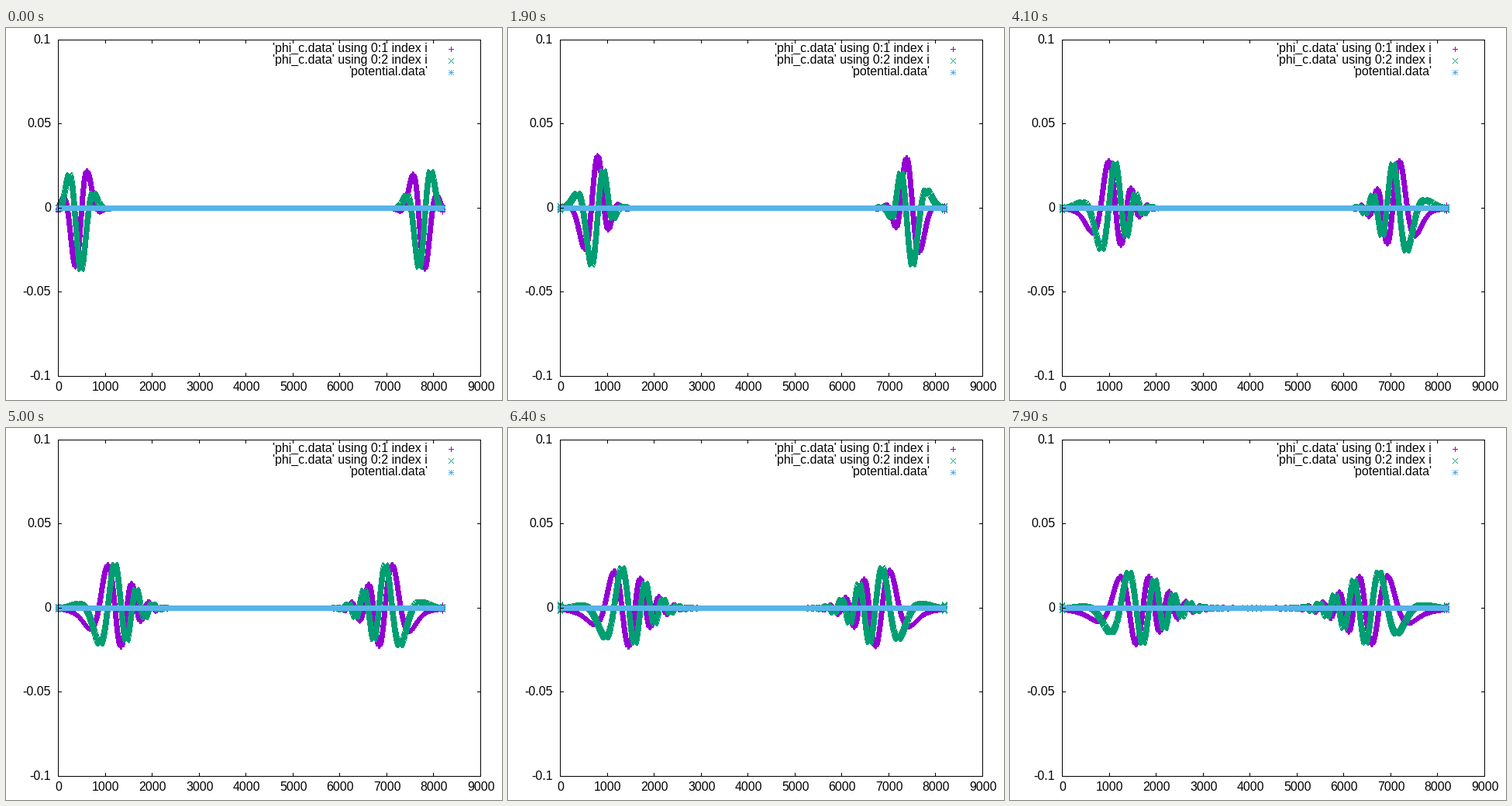
Recreate the animation shown at these times as a matplotlib script. Size 640 by 480 pixels, loop 8 s.

```python
import numpy as np
import matplotlib.pyplot as plt
from matplotlib.animation import FuncAnimation

W, H = 640, 480
FRAMES, STEP = 80, 100
LEFT, RIGHT, TOP, BOTTOM = 67, 612, 15, 449
TICK = 5
N = 8192

PURPLE, GREEN, BLUE = (148, 0, 211), (0, 158, 115), (86, 180, 233)

# Marker shapes as pixel offsets
ARM = range(-3, 4)
PLUS = [(i, 0) for i in ARM] + [(0, i) for i in ARM]
CROSS = [(i, i) for i in ARM] + [(i, -i) for i in ARM]
STAR = PLUS + CROSS

# Wave packet: wave number, start, dispersion
K, START, DISP = 0.0102, 435, 1377


def to_px(x):
    return np.rint(LEFT + np.asarray(x) * (RIGHT - LEFT) / 9000).astype(int)


def to_py(y):
    mid = (TOP + BOTTOM) / 2
    scale = (BOTTOM - TOP) / 0.2
    return np.ceil(mid - np.asarray(y) * scale - 0.5).astype(int)


def gaussian(d, t, amp, waist):
    """Spreading complex Gaussian at distance d from its centre."""
    q = 1 + 1j * DISP * t / waist**2
    return amp / np.sqrt(q) * np.exp(-d**2 / (2 * waist**2 * q))


def packet(x, t, phase):
    """Packet with a faint fast tail, leaving a wall at x = 0."""
    d = x - START - DISP * K * t
    shape = gaussian(d, t, 0.0355, 202) + gaussian(d, t, 0.003, 80)
    wave = shape * np.exp(1j * (phase + K * d + DISP * K**2 * t / 2))
    ripple = 0.0022 * np.exp(2j * np.pi * t / 17) * np.exp(-x / 10)
    return wave * (1 - np.exp(-x / 50)) - ripple * np.cos(np.pi * x)


def stamp(img, px, py, shape, color):
    for dx, dy in shape:
        img[py + dy, px + dx] = color


def draw_border(img):
    img[[TOP, BOTTOM], LEFT:RIGHT + 1] = 0
    img[TOP:BOTTOM + 1, [LEFT, RIGHT]] = 0
    for px in to_px(np.arange(0, 9001, 1000)):
        img[TOP:TOP + TICK, px] = 0
        img[BOTTOM + 1 - TICK:BOTTOM + 1, px] = 0
    for py in to_py(np.linspace(-0.1, 0.1, 5)):
        img[py, LEFT:LEFT + TICK] = 0
        img[py, RIGHT + 1 - TICK:RIGHT + 1] = 0


x = np.arange(N)
px = to_px(x)


def render(t):
    img = np.full((H, W, 3), 255, np.uint8)
    psi = packet(x, t, 4.05) + packet(N - 1 - x, t, 3.84)
    stamp(img, px, to_py(psi.real), PLUS, PURPLE)
    stamp(img, px, to_py(psi.imag), CROSS, GREEN)
    stamp(img, px, to_py(0 * x), STAR, BLUE)
    for py, shape, color in ((27, PLUS, PURPLE), (42, CROSS, GREEN),
                             (57, STAR, BLUE)):
        stamp(img, 574, py, shape, color)
    draw_border(img)
    return img


plt.rcParams["text.hinting"] = "native"
fig = plt.figure(figsize=(W / 100, H / 100), dpi=100, facecolor="white")
ax = fig.add_axes([0, 0, 1, 1])
ax.axis("off")
canvas = ax.imshow(render(0), extent=(0, W, H, 0), aspect="auto",
                   interpolation="nearest")
ax.set_xlim(0, W)
ax.set_ylim(H, 0)


def label(lx, ly, text, ha):
    ax.text(lx, ly, text, ha=ha, va="baseline", color="black",
            family="Liberation Sans", size=16 * 0.72)


for v in range(0, 9001, 1000):
    label(to_px(v) + 1, 468, str(v), "center")
for v in (-0.1, -0.05, 0, 0.05, 0.1):
    label(58, to_py(v) + 5, f"{v:g}", "right")
for row, text in enumerate(("'phi_c.data' using 0:1 index i",
                            "'phi_c.data' using 0:2 index i",
                            "'potential.data'")):
    label(544, 31 + 15 * row, text, "right")


def update(t):
    canvas.set_data(render(t))
    return [canvas]


anim = FuncAnimation(fig, update, frames=FRAMES, interval=STEP,
                     repeat=True, repeat_delay=0, blit=False)
plt.show()
```
